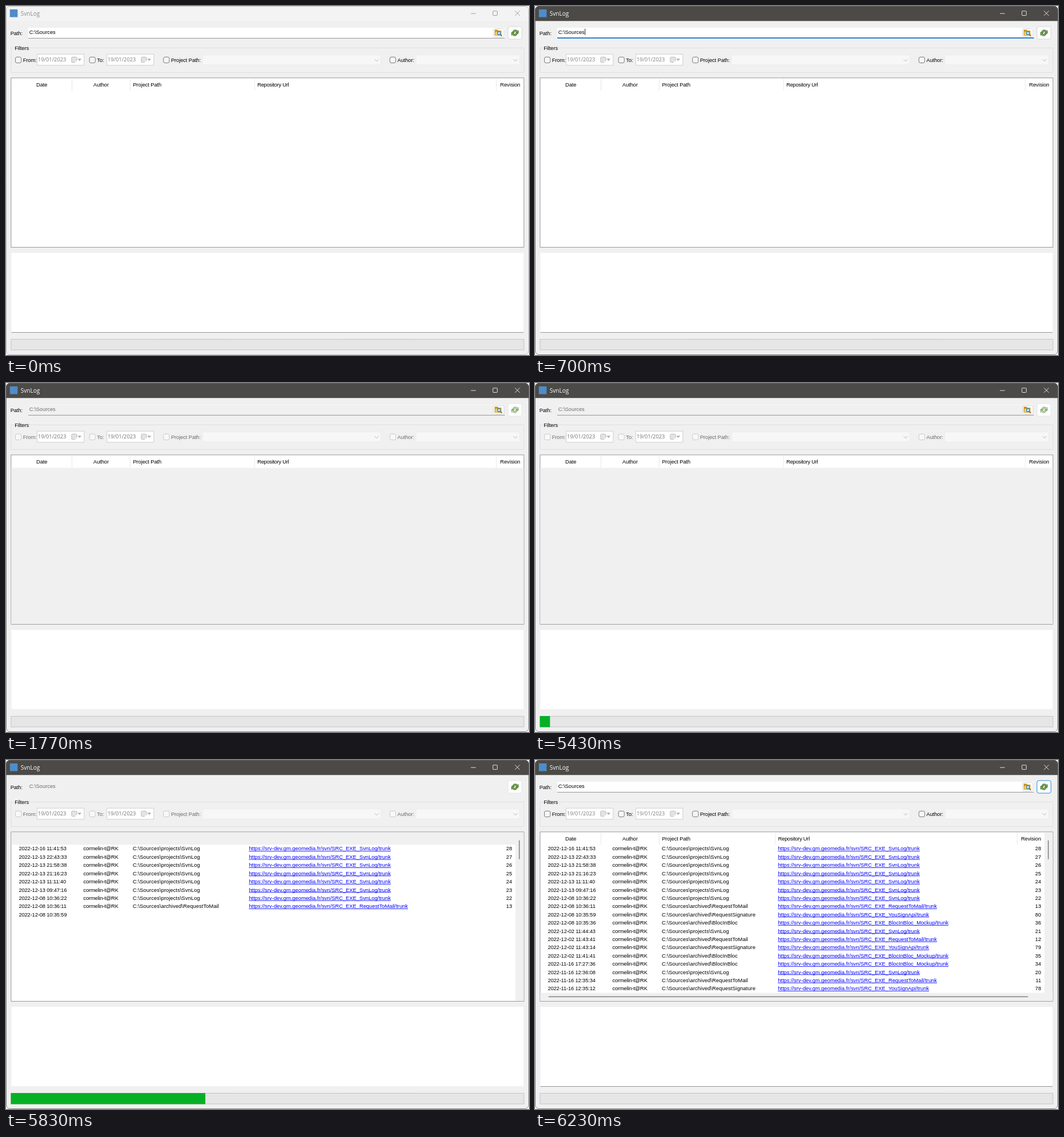
Write an HTML page with a canvas that moves like this. It is 916 px wide and 611 px high and loops after 8000 ms.

```html
<!DOCTYPE html>
<html lang="en">
<head>
<meta charset="utf-8">
<title>SvnLog</title>
<style>
  html, body { margin: 0; width: 100%; height: 100%; overflow: hidden; background: #fff; }
  canvas { display: block; width: 916px; height: 611px; }
</style>
</head>
<body>
<canvas id="stage" width="916" height="611"></canvas>
<script>
const ctx = document.getElementById('stage').getContext('2d');
// The window is laid out on a 1081 x 721 grid and scaled to the stage
const W = 1081, H = 721;
const LOOP = 8000, TICK = 66.6;
const FACE = '#f0f0f0', MUTED = '#6d6d6d', BLUE = [0, 103, 192];
const UI = '11px "Liberation Sans", Arial, sans-serif';
const TITLE = '11.8px "Open Sans", sans-serif';
const DATE = '11px "Open Sans", sans-serif';
const ACTIVATE = 500, HOVER = 1030, CARET_OFF = 1430, PRESS = 1570, BUSY = 1636;
const PROGRESS = 5430, LISTED = 5829, READY = 5896;

const USER = 'cormelin-t@RK';
const PROJECTS = {
  S: ['projects\\SvnLog', 'SvnLog'],
  M: ['archived\\RequestToMail', 'RequestToMail'],
  G: ['archived\\RequestSignature', 'YouSignApi'],
  B: ['archived\\BlocInBloc', 'BlocInBloc_Mockup']
};
const LOG = [
  '12-16 11:41:53 S 28', '12-13 22:43:33 S 27', '12-13 21:58:38 S 26',
  '12-13 21:16:23 S 25', '12-13 11:11:40 S 24', '12-13 09:47:16 S 23',
  '12-08 10:36:22 S 22', '12-08 10:36:11 M 13', '12-08 10:35:59 G 80',
  '12-08 10:35:36 B 36', '12-02 11:44:43 S 21', '12-02 11:43:41 M 12',
  '12-02 11:43:14 G 79', '12-02 11:41:41 B 35', '11-16 17:27:36 B 34',
  '11-16 12:36:08 S 20', '11-16 12:35:34 M 11', '11-16 12:35:12 G 78'
].map(s => s.split(' '));

const clamp = v => Math.max(0, Math.min(1, v));
// Fade advancing in discrete ticks
const fade = (t, start, n = 4) => clamp((Math.floor((t - start) / TICK) + 1) / n);
const mix = (a, b, k) => `rgb(${a.map((v, i) => Math.round(v + (b[i] - v) * k))})`;

function rect(x, y, w, h, color) {
  ctx.fillStyle = color;
  ctx.fillRect(x, y, w, h);
}

function box(x, y, w, h, r, fill, stroke) {
  ctx.beginPath();
  ctx.roundRect(x + .5, y + .5, w - 1, h - 1, r);
  if (fill) { ctx.fillStyle = fill; ctx.fill(); }
  if (stroke) { ctx.strokeStyle = stroke; ctx.lineWidth = 1; ctx.stroke(); }
}

function trace(pts) {
  ctx.beginPath();
  for (let i = 0; i < pts.length; i += 2) ctx.lineTo(pts[i], pts[i + 1]);
}

function line(color, width, ...pts) {
  trace(pts);
  ctx.strokeStyle = color;
  ctx.lineWidth = width;
  ctx.stroke();
}

function shape(color, ...pts) {
  trace(pts);
  ctx.fillStyle = color;
  ctx.fill();
}

function text(str, x, y, { color = '#000', font = UI, gap = -.1, align = 'left' } = {}) {
  ctx.font = font;
  ctx.letterSpacing = gap + 'px';
  ctx.textAlign = align;
  ctx.fillStyle = color;
  ctx.fillText(str, x, y);
  return ctx.measureText(str).width;
}

function titleBar(active) {
  const ink = active ? '#fff' : '#8c8c8c';
  rect(0, 0, W, 31, active ? '#4b4a47' : '#f3f3f3');
  rect(8, 7, 16, 16, '#4f8cc9');
  text('SvnLog', 30.5, 20, { color: ink, font: TITLE, gap: 0 });
  line(ink, 1, 961, 15.5, 971, 15.5);
  box(1006, 10, 10, 10, 1, null, ink);
  line(ink, 1, 1052, 10, 1062, 20);
  line(ink, 1, 1062, 10, 1052, 20);
}

function folderIcon() {
  box(1007, 46, 23, 19, 3, '#fdfdfd', '#d2d2d2');
  shape('#c99422', 1010, 49, 1016, 49, 1018, 51, 1024, 51, 1024, 61, 1010, 61);
  shape('#f7d56b', 1012, 53, 1025, 53, 1023, 60, 1011, 60);
  ctx.beginPath();
  ctx.arc(1019, 56, 3.4, 0, 7);
  ctx.fillStyle = '#b9e2f8';
  ctx.fill();
  ctx.strokeStyle = '#2d7fae';
  ctx.lineWidth = 1.4;
  ctx.stroke();
  line('#a8562a', 2.2, 1021.8, 58.8, 1025, 62);
}

function refreshIcon(alpha) {
  ctx.save();
  ctx.globalAlpha = alpha;
  ctx.translate(1052, 55.5);
  for (let i = 0; i < 2; i++) {
    const arrow = [-7, 0, -2, -6, 3, -6, 5, -4, 7, -5, 7, 1, 1, 1, 3, -1.5, 0, -3, -4, 1];
    shape('#6fa04e', ...arrow);
    line('#4f7339', .9, ...arrow, -7, 0);
    ctx.rotate(Math.PI);
  }
  ctx.restore();
}

function pathBar(t, s) {
  text('Path:', 9, 60);
  if (!s.repaint) {
    rect(46, 45, 985, 21, s.busy ? FACE : '#fff');
    if (s.busy) rect(46, 45, 985, 1, '#fbfbfb');
    const focus = fade(t, ACTIVATE) * (1 - fade(t, PRESS));
    rect(46, 66, 985, 1, mix([134, 134, 134], BLUE, focus));
    if (focus > .4) rect(46, 65, 985, 1, mix([255, 255, 255], BLUE, focus));
    folderIcon();
  }
  text('C:\\Sources', 48, 58, { color: s.busy ? MUTED : '#000', gap: 0 });
  if (t >= ACTIVATE && t < CARET_OFF) rect(103, 47, 1, 13, '#000');

  const hover = fade(t, HOVER) * (1 - fade(t, PRESS));
  const focused = fade(t, READY, 6);
  const idle = s.busy ? [226, 226, 226] : [208, 208, 208];
  const border = mix(idle, [0, 120, 212], Math.max(hover, focused));
  box(1037, 42, 30, 27, 4, mix([253, 253, 253], [224, 238, 249], hover), border);
  refreshIcon(s.busy && !s.repaint ? .5 : 1);
}

function check(x, label, s) {
  box(x, 105, 13, 13, 3, s.busy ? '#f8f8f8' : '#f6f6f6', s.busy ? '#c3c3c3' : '#646464');
  text(label, x + 16, 116, { color: s.busy ? MUTED : '#000' });
}

function datePicker(x, s) {
  box(x, 99, 98, 24, 0, '#fff', '#c6c6c6');
  text('19/01/2023', x + 2, 115, { color: s.busy ? '#707070' : '#7c7c7c', font: DATE, gap: 0 });
  box(x + 71, 105, 12, 12, 2, '#e3e3e3', '#b4b4b4');
  shape('#fff', x + 78, 117, x + 83, 117, x + 83, 112);
  shape('#b0b0b0', x + 84, 109, x + 92, 109, x + 88, 113.5);
}

function combo(x, w) {
  box(x, 101, w, 21, 2, '#f7f7f7', '#ededed');
  const c = x + w - 9;
  line('#a6a6a6', 1, c - 4, 110, c, 114, c + 4, 110);
}

function filters(s) {
  box(10, 86, 1061, 52, 0, null, '#dcdcdc');
  rect(17, 84, 31, 8, FACE);
  text('Filters', 18, 91);
  check(19, 'From:', s);
  datePicker(64, s);
  check(172, 'To:', s);
  datePicker(208, s);
  check(325, 'Project Path:', s);
  combo(406, 369);
  check(793, 'Author:', s);
  combo(847, 215);
}

function header(full) {
  const shift = full ? -17 : 0;
  rect(12, 150, 1057 + shift, 25, '#fff');
  [136, 256, 513 + shift, 1013 + shift].forEach(x => rect(x, 150, 1, 25, '#e3e3e3'));
  text('Date', 74, 166, { align: 'center' });
  text('Author', 196.5, 166, { align: 'center' });
  text('Project Path', 262.5, 166);
  text('Repository Url', 519.5 + shift, 166, { gap: -.33 });
  text('Revision', 1021.5 + shift, 166);
}

function logRow([day, time, key, rev], y, dateOnly) {
  const [path, repo] = PROJECTS[key];
  text(`2022-${day} ${time}`, 26.5, y, { gap: -.16 });
  if (dateOnly) return;
  text(USER, 160, y, { gap: -.2 });
  text('C:\\Sources\\' + path, 262, y, { gap: .1 });
  const url = `https://srv-dev.gm.geomedia.fr/svn/SRC_EXE_${repo}/trunk`;
  const w = text(url, 502, y, { color: '#00f', gap: 0 });
  rect(502, y + 1, w, 1, '#00f');
  text(rev, 1046, y, { align: 'right', gap: 0 });
}

function table(s) {
  box(10, 148, 1061, 351, 0, '#fff', '#828790');
  if (!s.listed) {
    if (s.busy) rect(11, 175, 1059, 323, FACE);
    header(false);
    return;
  }
  const count = s.repaint ? 9 : LOG.length;
  LOG.slice(0, count).forEach((row, i) => logRow(row, 187 + i * 17, s.repaint && i === 8));
  if (s.repaint) rect(12, 150, 1041, 25, FACE);
  else {
    header(true);
    rect(11, 481, 1059, 17, FACE);
    rect(28, 488, 991, 2, '#8b8b8b');
  }
  rect(1053, 150, 17, 348, FACE);
  rect(1060, 166, 2, 39, '#8b8b8b');
}

function footer(t, s) {
  box(10, 509, 1061, 166, 1, '#fff', '#ececec');
  if (!s.busy) rect(11, 674, 1059, 1, '#868686');
  box(10, 688, 1061, 23, 0, '#e6e6e6', '#bcbcbc');
  if (t >= PROGRESS && t < READY) {
    const k = Math.floor((t - PROGRESS) / TICK);
    rect(10, 688, 21 + k * 63.5, 23, '#06b025');
  }
}

function draw(t) {
  const s = {
    busy: t >= BUSY && t < READY,
    listed: t >= LISTED,
    repaint: t >= LISTED && t < READY
  };
  const active = t >= ACTIVATE;
  ctx.setTransform(916 / W, 0, 0, 611 / H, 0, 0);
  ctx.clearRect(0, 0, W, H);
  ctx.save();
  ctx.beginPath();
  ctx.roundRect(0, 0, W, H, 8);
  ctx.clip();
  rect(0, 0, W, H, FACE);
  titleBar(active);
  pathBar(t, s);
  filters(s);
  table(s);
  footer(t, s);
  box(0, 0, W, H, 8, null, active ? '#686765' : '#b0b0b0');
  ctx.restore();
}

const start = performance.now();
function loop() {
  draw((performance.now() - start) % LOOP);
  requestAnimationFrame(loop);
}
loop();
</script>
</body>
</html>
```
